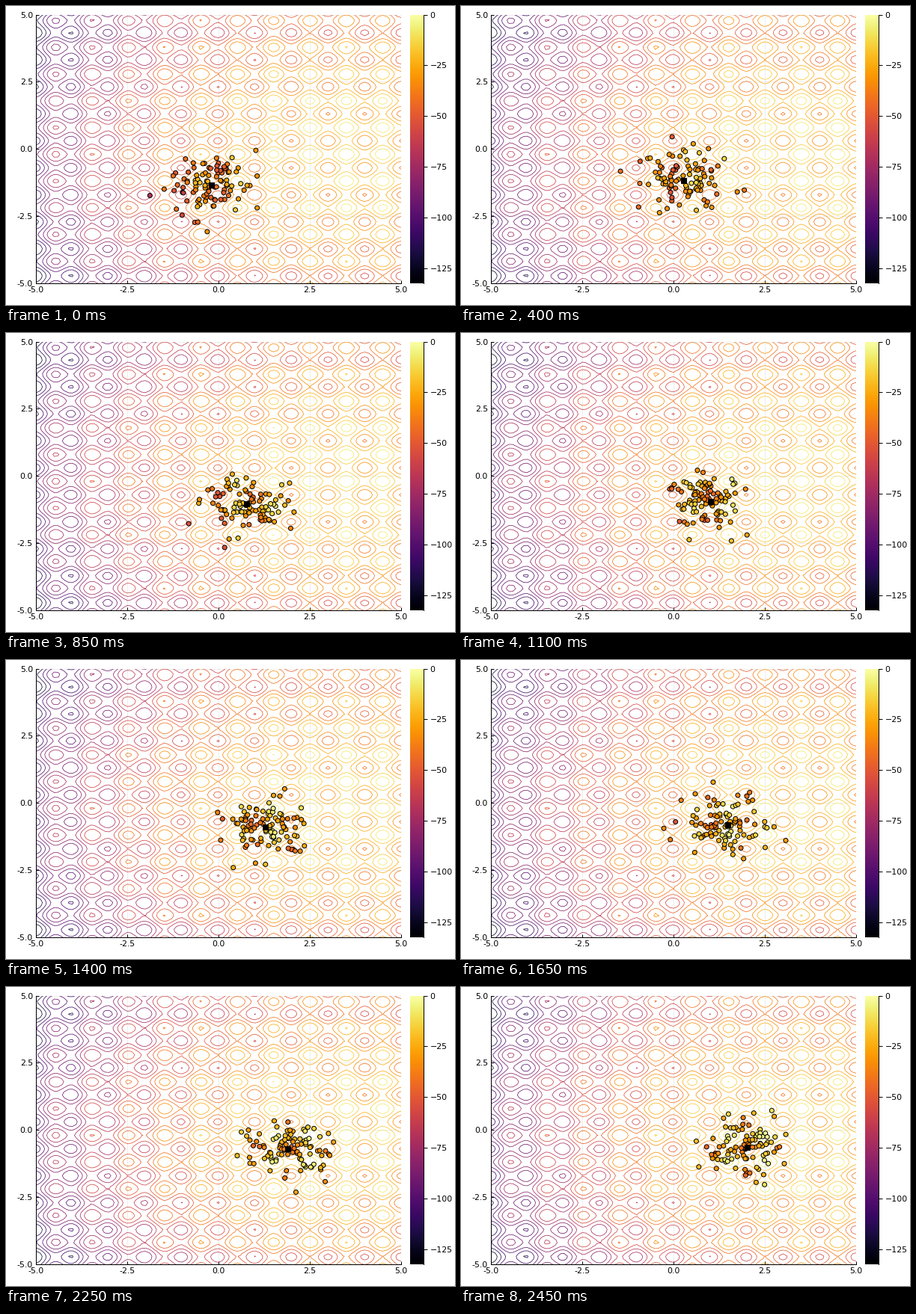
Recreate the animation shown at these times as a matplotlib script. Size 600 by 400 pixels, loop 2500 ms.

```python
import numpy as np
import matplotlib.pyplot as plt
from matplotlib.animation import FuncAnimation

W, H, DPI = 600, 400, 100
FRAMES, STEP = 50, 50
PX = 72 / DPI
COUNT, SPREAD = 100, 0.55
CENTER = (3.5, -0.2)
START, END = np.array([-0.2, -1.32]), np.array([2.01, -0.64])
LEFT, RIGHT, TOP, BOTTOM = 40, 528, 11.5, 371

plt.rcParams["font.family"] = "DejaVu Sans"


def rastrigin(x, y):
    u, v = x - CENTER[0], y - CENTER[1]
    return -(20 + u**2 + v**2
             - 10 * np.cos(2 * np.pi * u) - 10 * np.cos(2 * np.pi * v))


def add_axes(x0, x1):
    return fig.add_axes([x0 / W, 1 - BOTTOM / H,
                         (x1 - x0) / W, (BOTTOM - TOP) / H])


def style_axes(axes, shown):
    axes.tick_params(width=PX, labelsize=11 * PX)
    for side, spine in axes.spines.items():
        spine.set_visible(side in shown)
        spine.set_linewidth(PX)


def mean_at(i):
    """Search mean: a straight path that slows down gently."""
    s = i / (FRAMES - 1)
    return START + (END - START) * (1.37 * s - 0.37 * s**2)


def sample(i):
    """A fresh Gaussian generation around the mean."""
    z = np.random.default_rng(700 + i).normal(size=(COUNT, 2))
    r = np.hypot(z[:, 0], z[:, 1])
    z *= np.minimum(1, 3.2 / r)[:, None]
    return mean_at(i) + SPREAD * z


fig = plt.figure(figsize=(W / DPI, H / DPI), dpi=DPI, facecolor="white")

# Contour plot
ax = add_axes(LEFT, RIGHT)
grid = np.linspace(-5, 5, 101)
gx, gy = np.meshgrid(grid, grid)
z = rastrigin(gx, gy)
low, high = z.min(), 0
levels = np.linspace(low, high, 17)[1:-1]
ax.contour(gx, gy, z, levels=levels, cmap="inferno", vmin=low, vmax=high,
           linewidths=0.75 * PX, linestyles="solid")
ax.set(xlim=(-5, 5), ylim=(-5, 5))
ticks = np.arange(-5, 5.1, 2.5)
names = [f"{t:.1f}" for t in ticks]
ax.set_xticks(ticks, names)
ax.set_yticks(ticks, names)
ax.grid(color="black", alpha=0.1, linewidth=0.5)
ax.set_axisbelow(True)
ax.tick_params(direction="in", length=4 * PX, pad=4 * PX)
style_axes(ax, ("left", "bottom"))

# Colour bar
bar = add_axes(540, 558)
bar.imshow(np.linspace(low, high, 256)[:, None], cmap="inferno",
           origin="lower", aspect="auto", extent=(0, 1, low, high))
marks = range(-125, 1, 25)
bar.set_xticks([])
bar.set_yticks(marks, [str(m).replace("-", "\u2212") for m in marks])
bar.yaxis.tick_right()
bar.tick_params(axis="y", length=5 * PX, pad=3.5 * PX)
style_axes(bar, ("right",))

# Samples and their mean
dots = ax.scatter([0] * COUNT, [0] * COUNT, c=[0] * COUNT, cmap="inferno",
                  vmin=low, vmax=high, s=(6 * PX) ** 2, edgecolors="black",
                  linewidths=PX, zorder=5)
square, = ax.plot([], [], "s", color="black", markersize=7 * PX,
                  markeredgewidth=PX, zorder=6)


def update(i):
    pts = sample(i)
    dots.set_offsets(pts)
    dots.set_array(rastrigin(pts[:, 0], pts[:, 1]))
    mx, my = mean_at(i)
    square.set_data([mx], [my])
    return dots, square


anim = FuncAnimation(fig, update, frames=FRAMES, interval=STEP,
                     repeat=True, repeat_delay=0)
plt.show()
```
